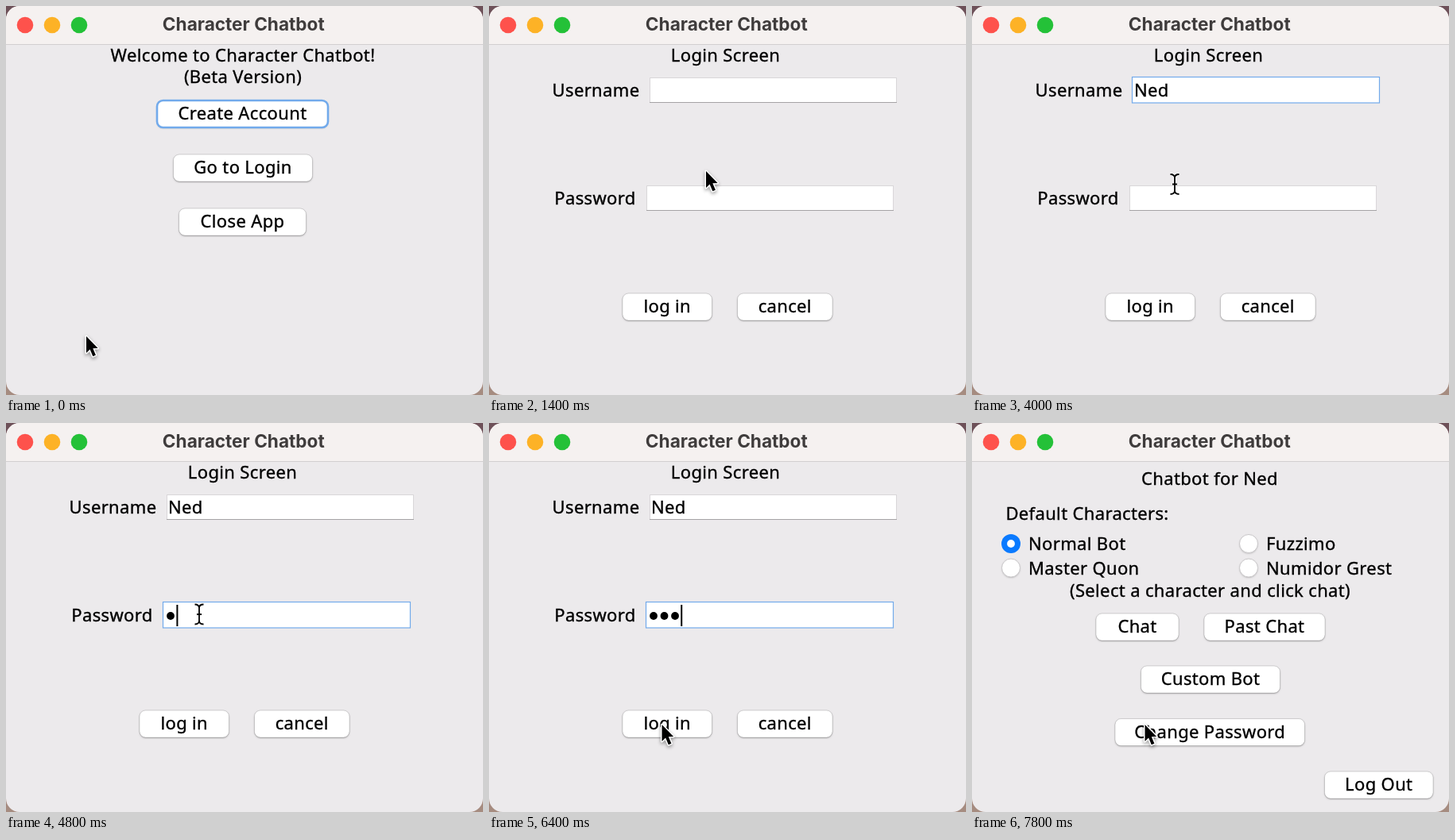
An HTML page with a canvas for the animation above (8000 ms loop, 600 by 490 pixels).

```html
<!DOCTYPE html>
<html lang="en">
<head>
<meta charset="utf-8">
<title>Character Chatbot</title>
<style>
  html, body { margin: 0; width: 100%; height: 100%; overflow: hidden; }
  canvas { display: block; }
</style>
</head>
<body>
<canvas id="stage" width="600" height="490"></canvas>
<script>
const ctx = document.getElementById('stage').getContext('2d');
const LOOP = 8000, STEP = 200;
const USER = 'Ned';
const PANEL = '#eceaec', BLUE = '#72aaeb';
const LABEL_FONT = '22px "Noto Sans", "Open Sans", sans-serif';

// Pointer keyframes: [start ms, x, y, shape]; each pose holds until the next.
const POINTER = [
  [0, 101, 416, 'arrow'], [400, 112, 400, 'arrow'], [600, 165, 335, 'arrow'],
  [800, 242, 240, 'arrow'], [1000, 273, 208, 'arrow'],
  [1800, 283, 186, 'arrow'], [2000, 313, 132, 'arrow'], [2200, 328.5, 105.5, 'beam'],
  [3800, 300, 165, 'arrow'], [4000, 255, 224.5, 'beam'], [4200, 243, 241, 'beam'],
  [5600, 223, 341, 'arrow'], [5800, 220, 363, 'arrow'], [6000, 218, 376, 'arrow'],
  [6200, 217.5, 380, 'arrow']
];

const within = (t, from, to) => t >= from && t < to;
const typed = (t, starts) => starts.filter(start => t >= start).length;

function label(text, x, y, align = 'center') {
  ctx.font = LABEL_FONT;
  ctx.letterSpacing = '0.35px';
  ctx.textAlign = align;
  ctx.fillStyle = ctx.strokeStyle = '#000';
  ctx.lineWidth = 0.35;
  ctx.fillText(text, x, y);
  ctx.strokeText(text, x, y);
}

function disc(x, y, r, color) {
  ctx.beginPath();
  ctx.arc(x, y, r, 0, 2 * Math.PI);
  ctx.fillStyle = color;
  ctx.fill();
}

function roundRect(x, y, w, h, r) {
  ctx.beginPath();
  ctx.roundRect(x, y, w, h, r);
}

function shadow(color, blur, y) {
  ctx.shadowColor = color;
  ctx.shadowBlur = blur;
  ctx.shadowOffsetY = y;
}

function button(text, x, y, w, state = '') {
  ctx.save();
  roundRect(x, y, w, 34, 7.5);
  shadow('rgba(0,0,0,.28)', 2, 1);
  ctx.fillStyle = state === 'pressed' ? '#efedef' : '#fff';
  ctx.fill();
  ctx.restore();
  roundRect(x, y, w, 34, 7.5);
  ctx.strokeStyle = state ? BLUE : 'rgba(0,0,0,.14)';
  ctx.lineWidth = state ? 2.6 : 1;
  ctx.stroke();
  label(text, x + w / 2, y + 24);
}

function caret(x, y) {
  ctx.fillStyle = '#000';
  ctx.fillRect(x, y, 2, 27);
}

function field(x, y, focused) {
  ctx.fillStyle = '#fff';
  ctx.fillRect(x + 1, y + 1, 311, 32);
  if (focused) {
    ctx.strokeStyle = BLUE;
    ctx.lineWidth = 1.2;
    ctx.strokeRect(x + 0.5, y + 0.5, 311, 32.5);
    return;
  }
  ctx.strokeStyle = '#d9d7d9';
  ctx.lineWidth = 1;
  ctx.strokeRect(x + 1.5, y + 1.5, 310, 31);
  ctx.fillStyle = '#a5a3a5';
  ctx.fillRect(x + 1, y + 32, 311, 1);
}

function radio(text, x, y, selected = false) {
  if (selected) {
    disc(x, y, 12, '#0a7aff');
    disc(x, y, 4.9, '#fff');
  } else {
    ctx.save();
    shadow('rgba(0,0,0,.2)', 2, 1);
    disc(x, y, 11.5, '#fff');
    ctx.restore();
    ctx.strokeStyle = '#c9c7c9';
    ctx.lineWidth = 1;
    ctx.stroke();
  }
  label(text, x + 22, y + 8, 'left');
}

function windowFrame() {
  const desk = ctx.createLinearGradient(0, 0, 0, 490);
  desk.addColorStop(0, '#6d5058');
  desk.addColorStop(1, '#a68c80');
  ctx.fillStyle = desk;
  ctx.fillRect(0, 0, 600, 490);

  ctx.save();
  roundRect(0, 0, 600, 490, 17);
  ctx.clip();
  ctx.fillStyle = PANEL;
  ctx.fillRect(0, 0, 600, 490);
  ctx.fillStyle = '#f5f1f0';
  ctx.fillRect(0, 0, 600, 48);
  ctx.fillStyle = '#d2cfd0';
  ctx.fillRect(0, 48, 600, 1);
  ctx.restore();

  ['#fe524c', '#fdb226', '#24c138'].forEach((color, i) => disc(24 + 34 * i, 24, 10.3, color));
  ctx.font = 'bold 22.6px Inter, sans-serif';
  ctx.letterSpacing = '0px';
  ctx.textAlign = 'center';
  ctx.fillStyle = '#3f3c3c';
  ctx.fillText('Character Chatbot', 298.8, 31);
}

function welcomeScreen(t) {
  const pressed = t >= 1200;
  label('Welcome to Character Chatbot!', 298, 70);
  label('(Beta Version)', 298, 97);
  button('Create Account', 190, 119, 215, pressed ? '' : 'focused');
  button('Go to Login', 210.5, 187, 175, pressed ? 'pressed' : '');
  button('Close App', 217.5, 255, 160);
}

function loginScreen(t) {
  const nameFocused = within(t, 2400, 4400);
  const passFocused = within(t, 4400, 7600);
  const name = USER.slice(0, typed(t, [3000, 3200, 3600]));
  const dots = typed(t, [4800, 5000, 5200]);

  label('Login Screen', 297.5, 70);
  label('Username', 134.5, 114);
  label('Password', 133.5, 250);
  field(201, 89, nameFocused);
  field(197, 225, passFocused);

  label(name, 204, 114, 'left');
  if (within(t, 2400, 2800) || within(t, 3000, 4000)) {
    caret(204 + ctx.measureText(name).width, 93);
  }
  for (let i = 0; i < dots; i++) disc(207 + 13.5 * i, 243, 4.9, '#000');
  if (within(t, 4400, 6000) || within(t, 6400, 7000)) {
    caret(201 + 13.4 * dots, 229);
  }

  button('log in', 168, 362, 112.5, t >= 7600 ? 'pressed' : '');
  button('cancel', 312.5, 362, 119.5);
}

function chatScreen() {
  label('Chatbot for ' + USER, 299, 78);
  label('Default Characters:', 145, 122);
  radio('Normal Bot', 49, 152, true);
  radio('Master Quon', 49, 182.5);
  radio('Fuzzimo', 348, 152);
  radio('Numidor Grest', 348, 182.5);
  label('(Select a character and click chat)', 299.5, 219);
  button('Chat', 156, 240, 104);
  button('Past Chat', 292, 240, 152);
  button('Custom Bot', 212.5, 306, 175);
  button('Change Password', 180, 372.5, 238.5);
  button('Log Out', 443.5, 439, 136.5);
}

function pointer(x, y, shape) {
  ctx.save();
  ctx.translate(x, y);
  ctx.lineJoin = 'round';
  ctx.strokeStyle = '#fff';
  if (shape === 'arrow') {
    const outline = new Path2D('M0 0V21L4.6 16.6L8.3 25.2L11.9 23.7L8.3 15.2L14.6 15Z');
    ctx.save();
    shadow('rgba(0,0,0,.4)', 4, 2);
    ctx.lineWidth = 3;
    ctx.stroke(outline);
    ctx.restore();
    ctx.fillStyle = '#000';
    ctx.fill(outline);
  } else {
    const beam = new Path2D('M-5.5 -12.5Q0 -12.5 0 -8Q0 -12.5 5.5 -12.5M0 -8V8M-5.5 12.5Q0 12.5 0 8Q0 12.5 5.5 12.5M-3 0H3');
    ctx.lineWidth = 3.6;
    ctx.stroke(beam);
    ctx.strokeStyle = '#000';
    ctx.lineWidth = 1.8;
    ctx.stroke(beam);
  }
  ctx.restore();
}

function draw(now) {
  const t = Math.floor((now % LOOP) / STEP) * STEP;
  windowFrame();
  if (t < 1400) welcomeScreen(t);
  else if (t < 7800) loginScreen(t);
  else chatScreen();
  const [, x, y, shape] = POINTER.filter(([start]) => t >= start).pop();
  pointer(x, y, shape);
  requestAnimationFrame(() => draw(performance.now()));
}

draw(performance.now());
</script>
</body>
</html>
```
